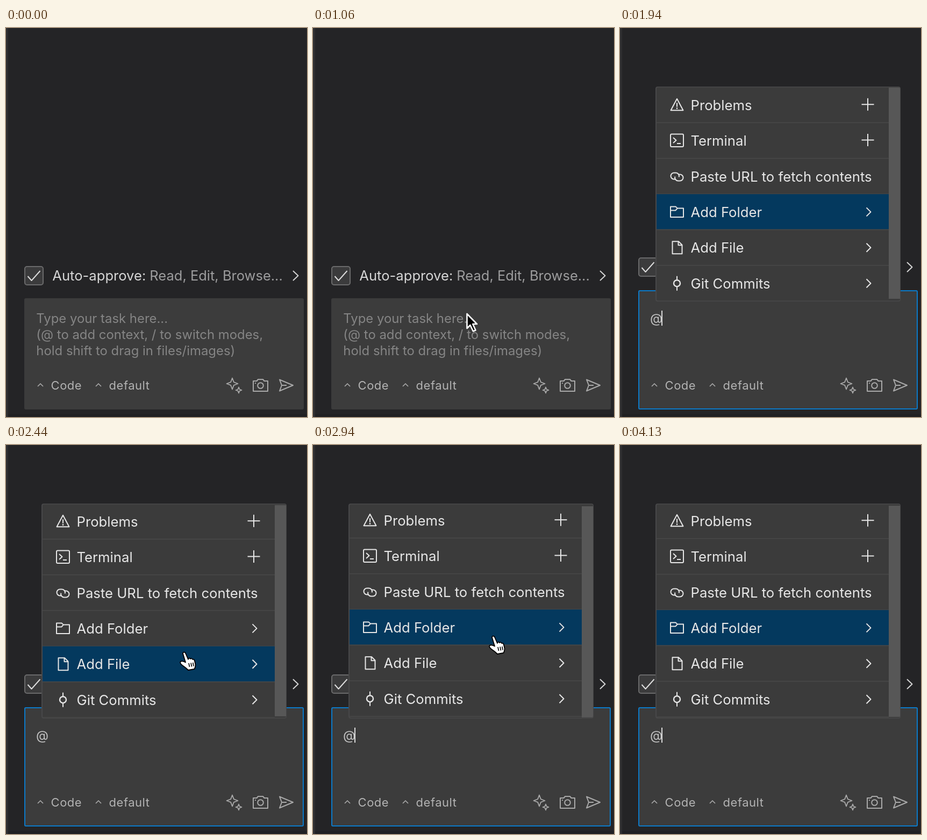
Animation of 560x724 px, one loop 4450 ms. Source, as an HTML page with a canvas:

```html
<!DOCTYPE html>
<html lang="en">
<head>
<meta charset="utf-8">
<title>Context menu</title>
<style>
  html, body { margin: 0; width: 100%; height: 100%; overflow: hidden; background: #242426; }
  canvas { display: block; width: 560px; height: 724px; }
</style>
</head>
<body>
<canvas id="stage"></canvas>
<script>
const W = 560, H = 724, LOOP = 4450, TICK = 62.5;
const FOCUS = 1125, OPEN = 1937.5, BLINK = 500;
const ROW_TOP = 110, ROW_H = 66.4;
const FONT = 'Inter, "Open Sans", sans-serif';

const canvas = document.getElementById('stage');
const ctx = canvas.getContext('2d');
const dpr = window.devicePixelRatio || 1;
canvas.width = W * dpr;
canvas.height = H * dpr;

// ---- helpers ----
function rect(x, y, w, h, fill) {
  ctx.fillStyle = fill;
  ctx.fillRect(x, y, w, h);
}

function box(x, y, w, h, r, fill, line, width = 2) {
  ctx.beginPath();
  ctx.roundRect(x, y, w, h, r);
  if (fill) { ctx.fillStyle = fill; ctx.fill(); }
  if (line) { ctx.strokeStyle = line; ctx.lineWidth = width; ctx.stroke(); }
}

function text(str, x, y, size, fill, spacing = 0) {
  ctx.font = `400 ${size}px ${FONT}`;
  ctx.letterSpacing = spacing + 'px';
  ctx.fillStyle = fill;
  ctx.fillText(str, x, y);
}

function stroke(d, color, width = 2) {
  ctx.strokeStyle = color;
  ctx.lineWidth = width;
  ctx.stroke(new Path2D(d));
}

function at(x, y, draw) {
  ctx.save();
  ctx.translate(x, y);
  draw();
  ctx.restore();
}

const mix = (a, b, k) => a + (b - a) * k;
const easeOut = k => 1 - (1 - k) ** 3;

function glide(t, from, to, a, b) {
  const k = easeOut(Math.min(1, Math.max(0, (t - from) / (to - from))));
  return [mix(a[0], b[0], k), mix(a[1], b[1], k)];
}

// ---- state over time ----
function pointer(t) {
  if (t < 687.5) return null;
  if (t < FOCUS) return ['arrow', ...glide(t, 687.5, 1062.5, [301, 592], [285, 529])];
  if (t < OPEN) return ['beam', 287, 534];
  if (t < 2375) return null;
  if (t < 2437.5) return ['arrow', 530, 415];
  if (t < 3437.5) return ['hand', ...glide(t, 2437.5, 2812.5, [332, 386], [336, 356])];
  if (t < 3500) return ['hand', 440, 358];
  return null;
}

function scrollAt(t) {
  if (t < 2375) return 0;
  if (t < 2500) return 1;
  if (t < 2625) return 2;
  return t < 3250 ? 3 : 2;
}

const caretOn = (t, since) => Math.floor((t - since) / BLINK) % 2 === 0;

// ---- menu icons, centred on 0,0 ----
const icons = {
  warning(c) {
    stroke('M0 -11.5 L11.5 10 H-11.5 Z M0 -4 V3.5', c);
    ctx.fillStyle = c;
    ctx.fillRect(-1.2, 5, 2.4, 2.6);
  },
  terminal(c) {
    box(-12, -12, 24, 23.5, 2, null, c);
    stroke('M-7 -5.5 L-1.5 -0.5 L-7 4.5 M0 5.5 H7', c);
  },
  link(c) {
    stroke('M-3 5.5 H-5.5 A6 6 0 0 1 -5.5 -6.5 H-2 A6 6 0 0 1 3.6 1.5', c);
    stroke('M3 -3.5 H5.5 A6 6 0 0 1 5.5 8.5 H2 A6 6 0 0 1 -3.6 0.5', c);
  },
  folder(c) {
    stroke('M-12 9.5 V-10 H-2.5 L0.5 -7 H12 V9.5 Z M-12 -3 H-2.5 L0.5 -6.5', c);
  },
  file(c) {
    stroke('M-8.5 -11.5 H3 L9.5 -5 V11.5 H-8.5 Z M2.5 -11 V-4.5 H9', c);
  },
  commit(c) {
    ctx.beginPath();
    ctx.arc(0, 0, 6, 0, Math.PI * 2);
    ctx.strokeStyle = c;
    ctx.lineWidth = 2.4;
    ctx.stroke();
    stroke('M0 -13.5 V-6 M0 6 V13.5', c);
  }
};

const rows = [
  ['warning', 'Problems', 'plus'],
  ['terminal', 'Terminal', 'plus'],
  ['link', 'Paste URL to fetch contents', ''],
  ['folder', 'Add Folder', 'more'],
  ['file', 'Add File', 'more'],
  ['commit', 'Git Commits', 'more']
];

// ---- parts ----
function approveBar(y) {
  box(35, y - 17, 34, 34, 4, '#3b3b3c', '#6a6a6b');
  stroke(`M40.5 ${y + 1} L47.5 ${y + 9} L63.5 ${y - 9}`, '#dcdcdc');
  text('Auto-approve:', 86.3, y + 9, 25.6, '#d6d6d6');
  text('Read, Edit, Browse...', 267.3, y + 9, 25.5, '#9d9d9e');
  stroke(`M534 ${y - 9} L543.5 ${y} L534 ${y + 9}`, '#d4d4d4');
}

function sparkle(x, y, r) {
  const q = r * 0.27;
  at(x, y, () => stroke(
    `M0 ${-r} L${q} ${-q} L${r} 0 L${q} ${q} L0 ${r} L${-q} ${q} L${-r} 0 L${-q} ${-q} Z`, '#a9a9a9', 1.8));
}

function toolbar() {
  const c = '#a9a9a9';
  for (const [x, label] of [[64, 'Code'], [172, 'default']]) {
    stroke(`M${x - 5} 667 L${x} 662 L${x + 5} 667`, c, 1.7);
    text(label, x + 19.6, 673, 22, '#b3b3b3', 0.5);
  }
  sparkle(421, 662, 10.5);
  sparkle(433, 674, 5.5);
  stroke('M460 657 H466.5 L469 654 H478 L480.5 657 H487 V676 H460 Z', c);
  ctx.beginPath();
  ctx.arc(473.5, 665.5, 5.3, 0, Math.PI * 2);
  ctx.stroke();
  rect(463, 660, 2, 2, c);
  stroke('M509 654.5 L534 665 L509 675.5 L513 665 Z M513 665 H522', c);
}

function inputBox(t) {
  const open = t >= OPEN;
  const top = open ? 488 : 503;
  box(34, top, 520, 710 - top, 3, '#3c3c3c');
  if (t >= FOCUS) box(35, top + 1, 518, 708 - top, 2, null, '#0b7ac9');
  if (open) {
    text('@', 56, 549, 23.8, '#c2c2c2');
    if (caretOn(Math.min(t, 4400), OPEN)) rect(77, 526, 2, 28, '#d8d8d8');
  } else {
    const hint = ['Type your task here...', '(@ to add context, / to switch modes,', 'hold shift to drag in files/images)'];
    hint.forEach((line, i) => text(line, 56.3, 549 + i * 30, 23.9, '#858585'));
    if (t >= FOCUS && caretOn(t, FOCUS)) rect(57, 526, 2, 28, '#d8d8d8');
  }
  toolbar();
}

function menu(t, mouse) {
  const shift = scrollAt(t);
  const active = mouse && mouse[0] === 'hand'
    ? Math.floor((mouse[2] - ROW_TOP + shift) / ROW_H) : 3;
  box(66, 109, 456, 400, 4, '#484849');
  ctx.save();
  ctx.beginPath();
  ctx.roundRect(68, 110.5, 453, 397, 3);
  ctx.clip();
  rect(68, 110, 453, 398, '#3b3b3b');
  rows.forEach(([icon, label, action], i) => {
    const top = ROW_TOP + i * ROW_H - shift;
    const mid = top + ROW_H / 2;
    const c = '#e6e6e6';
    if (i === active) rect(68, top, 432, ROW_H - 1, '#04395e');
    rect(68, top + ROW_H - 1, 432, 1.6, '#484848');
    at(106, mid, () => icons[icon](c));
    text(label, 131.5, mid + 9.6, 25.7, c);
    if (action === 'plus') stroke(`M449.5 ${mid - 1} H472.5 M461 ${mid - 12.5} V${mid + 10.5}`, c);
    if (action === 'more') stroke(`M458.5 ${mid - 8} L466.5 ${mid} L458.5 ${mid + 8}`, c);
  });
  rect(500, 111 + shift, 21, 393, '#575757');
  ctx.restore();
}

const cursors = {
  arrow() {
    const p = new Path2D('M1.5 3 V30 L7.5 24 L13 35.5 L17.5 33.5 L12.3 22 H20 Z');
    ctx.lineWidth = 2.6;
    ctx.strokeStyle = '#fff';
    ctx.fillStyle = '#000';
    ctx.fill(p);
    ctx.stroke(p);
  },
  beam() {
    const d = 'M-6 -16 Q0 -16 0 -11 Q0 -16 6 -16 M-6 17 Q0 17 0 12 Q0 17 6 17 M0 -12 V13 M-4 4 H4';
    stroke(d, '#fff', 5.5);
    stroke(d, '#000', 2);
  },
  hand() {
    const p = new Path2D('M-3 2 Q-2 -2 1.5 0.5 L7 13 Q8 9 11 12 Q13 10 15 13 Q18 12 19 16 L20.5 23 ' +
      'Q20.5 27 18.5 31 L7 33 Q2 28 -4 24 Q-9 20 -7.5 17.5 Q-5 15 2 18.5 Z');
    ctx.fillStyle = '#fff';
    ctx.fill(p);
    ctx.strokeStyle = '#000';
    ctx.lineWidth = 1.8;
    ctx.stroke(p);
    stroke('M8 20 L9.5 27 M12 19.5 L13.5 26.5 M15.8 19 L17 25.5', '#000', 1.6);
  }
};

function draw(t) {
  ctx.setTransform(dpr, 0, 0, dpr, 0, 0);
  ctx.lineJoin = 'round';
  ctx.lineCap = 'butt';
  rect(0, 0, W, H, '#242426');
  rect(0, 0, 4, H, '#2e2e30');
  rect(4, 719, W - 4, 5, '#202022');

  const open = t >= OPEN;
  const mouse = pointer(t);
  approveBar(open ? 445 : 461);
  inputBox(t);
  if (open) menu(t, mouse);
  if (mouse) at(mouse[1], mouse[2], cursors[mouse[0]]);
}

const start = performance.now();
function frame() {
  const t = (performance.now() - start) % LOOP;
  draw(Math.floor((t + 4) / TICK) * TICK);
  requestAnimationFrame(frame);
}
frame();
</script>
</body>
</html>
```
